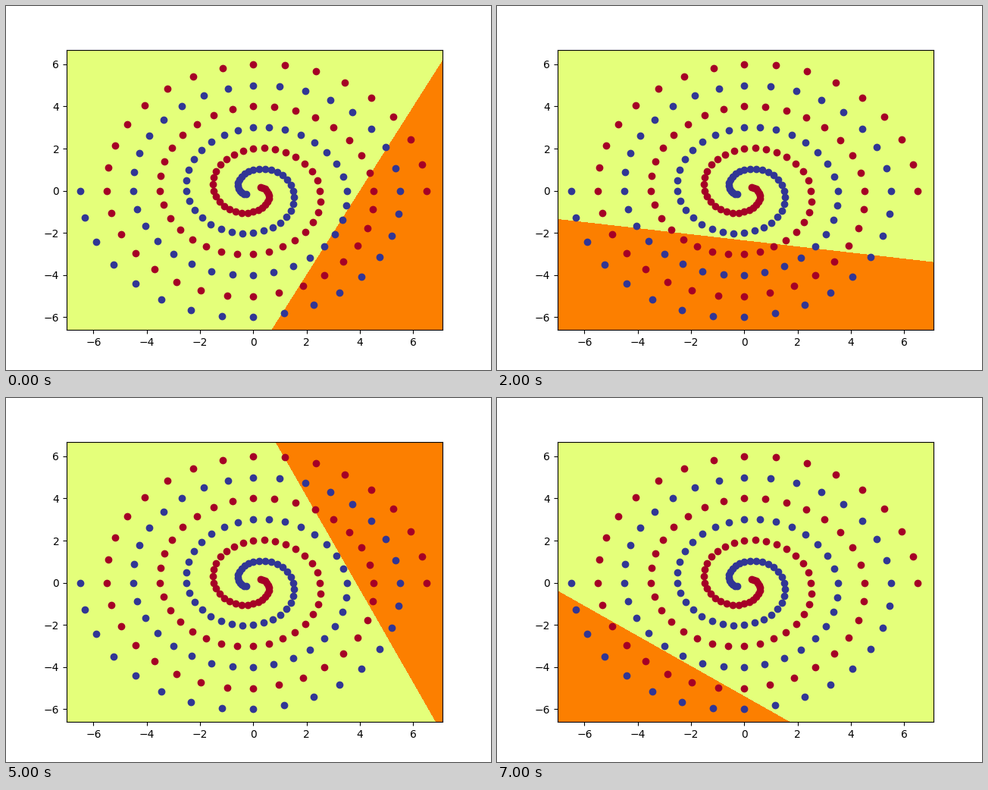
A matplotlib script that plays this animation: 640 px wide and 480 px high, repeating every 8 s.

```python
import numpy as np
import matplotlib.pyplot as plt
from matplotlib.animation import FuncAnimation
from matplotlib.patches import Polygon

LIME, ORANGE = "#e4ff7a", "#fc7f00"
RED, BLUE = "#a50026", "#313695"
X0, X1, Y0, Y1 = -7.005, 7.095, -6.605, 6.695

# Decision boundary of each hidden unit: the active side lies left of start -> end.
BOUNDARIES = [
    ((X1, 6.15), (0.70, Y0)),
    ((-0.40, Y1), (X0, 1.00)),
    ((X1, -3.40), (X0, -1.36)),
    ((X0, 1.11), (X1, 4.31)),
    ((-4.74, Y1), (-1.80, Y0)),
    ((0.84, Y1), (6.86, Y0)),
    ((X1, -2.60), (-0.30, Y0)),
    ((1.68, Y0), (X0, -0.40)),
]


def half_plane(start, end, reach=40):
    """Corners of a large quad covering the left side of a line."""
    a, b = np.array(start), np.array(end)
    along = (b - a) / np.hypot(*(b - a)) * reach
    normal = np.array([-along[1], along[0]])
    return [a - along, b + along, b + along + normal, a - along + normal]


def spiral(count=100):
    i = np.arange(count)
    angle = i * np.pi / 16
    radius = 6.5 * (104 - i) / 104
    return radius * np.cos(angle), radius * np.sin(angle)


fig, ax = plt.subplots(figsize=(6.4, 4.8), dpi=100)
ax.set_facecolor(LIME)
region = ax.add_patch(Polygon(half_plane(*BOUNDARIES[0]), facecolor=ORANGE,
                              linewidth=0, antialiased=False, zorder=0.5))
x, y = spiral()
ax.scatter(x, y, c=RED)
ax.scatter(-x, -y, c=BLUE)
ax.set_xlim(X0, X1)
ax.set_ylim(Y0, Y1)


def update(unit):
    region.set_xy(half_plane(*BOUNDARIES[unit]))
    return [region]


anim = FuncAnimation(fig, update, frames=len(BOUNDARIES), interval=1000,
                     repeat=True, repeat_delay=0)
plt.show()
```
